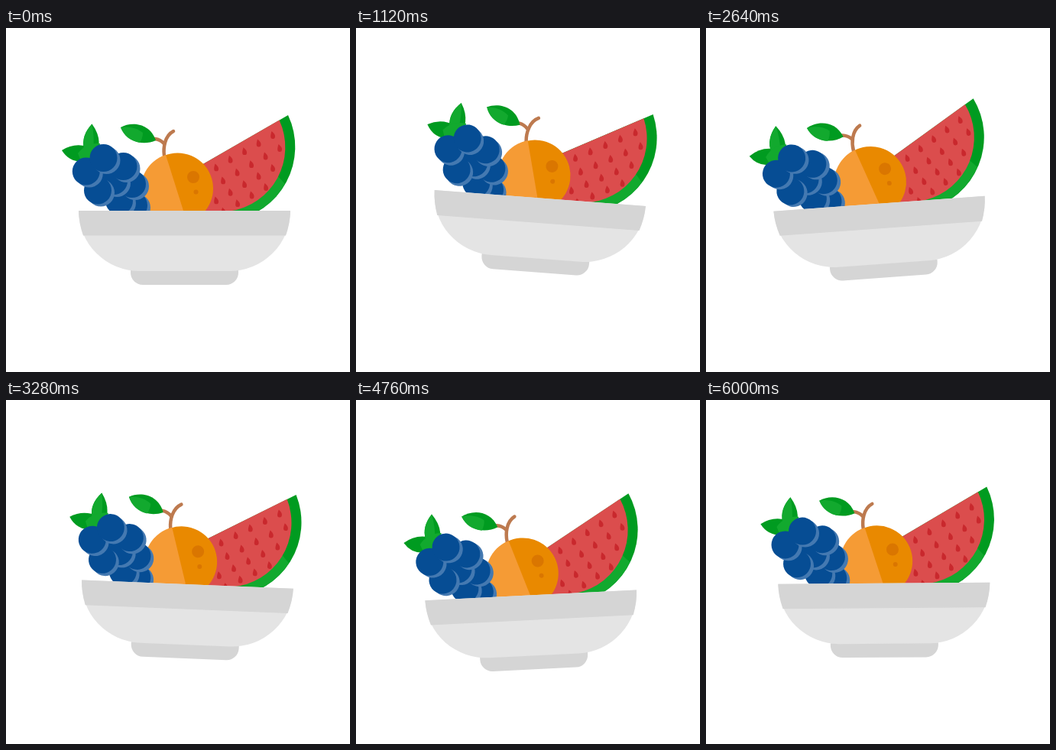
Animation, 450 px wide and 450 px high, one loop 6.04 s. Source, as an HTML page:

```html
<!DOCTYPE html>
<html lang="en">
<head>
<meta charset="utf-8">
<title>Fruit bowl</title>
<style>
html, body { margin: 0; width: 100%; height: 100%; overflow: hidden; background: #fff; }
svg { display: block; width: 100%; height: 100%; }
</style>
</head>
<body>
<svg viewBox="0 0 450 450">
  <g id="all">
    <g id="melon">
      <path fill="#009b20" d="M369 114A97.5 97.5 0 0 1 295 252L230 194Z"/>
      <path fill="#12a92e" d="M365 204A97.5 97.5 0 0 1 295 252L270 200L353 191Z"/>
      <path fill="#db4d4d" d="M357.500 120.600A84.300 84.300 0 0 1 293 239.500L230 250V194Z"/>
      <g id="seeds" fill="#c9282d"></g>
    </g>
    <g id="orange">
      <g fill="none" stroke="#bd7a4f" stroke-width="4.5" stroke-linecap="round">
        <path d="M207 167C205.500 157 207.500 141 219 135"/>
        <path d="M206.500 151Q202 146 195 145"/>
      </g>
      <path fill="#009b20" d="M150 130C164 122 188 124 196 147C180 154 159 150 150 130Z"/>
      <path fill="#12a92e" d="M150 130C161 128 172 131 179 137Q179 144 175 150C163 148 154 141 150 130Z"/>
      <circle cx="224.500" cy="210" r="46.500" fill="#e98900"/>
      <path fill="#f59b35" d="M209 166L237 254.800A46.500 46.500 0 0 1 209 166Z"/>
      <circle cx="245" cy="195" r="8" fill="#da7600"/>
      <circle cx="248.500" cy="214.500" r="3" fill="#da7600"/>
    </g>
    <g id="grapes">
      <path fill="#009b20" d="M73 160Q90 149 110 156L107 174Q84 178 73 160Z"/>
      <path fill="#009b20" d="M112.500 125.500Q98 141 102 158L114 172Q130 150 112.500 125.500Z"/>
      <path fill="#12a92e" d="M112.500 125.500Q98 141 102 158L114 160Q116 143 112.500 125.500Z"/>
      <path fill="#12a92e" d="M94 164Q104 150 123 151Q122 164 114 174H98Z"/>
      <g id="berries"></g>
    </g>
    <path fill="#d5d5d5" d="M163 317H304V320A16 16 0 0 1 288 336H179A16 16 0 0 1 163 320Z"/>
    <path fill="#e4e4e4" d="M95 239H372A80 79 0 0 1 292 318H175A80 79 0 0 1 95 239Z"/>
    <path fill="#d5d5d5" d="M95 239H372Q371.500 256 366 271.500H101Q95.500 256 95 239Z"/>
  </g>
</svg>
<script>
const el = id => document.getElementById(id);

// Seeds: four slanted rows of teardrops
el('seeds').innerHTML = [[349, 140], [358, 157], [349, 183], [340, 208]].map(([x, y]) =>
  [0, 1, 2, 3, 4].map(i =>
    `<path transform="translate(${x - 18.5 * i} ${y + 10.6 * i})" d="M-1.500 -5Q3.500 -1 3 2A2.900 2.900 0 0 1 -2.800 2Q-3 0 -1.500 -5Z"/>`
  ).join('')).join('');

// Each berry is a dark disc over a lighter one, upper left on top
el('berries').innerHTML = [[167, 232], [148, 226], [165, 204], [141, 200], [120, 212.5], [153.5, 181], [104.8, 187.5], [127.5, 170]]
  .map(([x, y]) =>
    `<circle cx="${x + 4}" cy="${y + 3}" r="18" fill="#4479b1"/><circle cx="${x}" cy="${y}" r="18" fill="#064d94"/>`
  ).join('');

const turn = (id, angle, x, y) => el(id).setAttribute('transform', `rotate(${angle} ${x} ${y})`);

function draw(now) {
  const t = Math.floor(now % 6040 / 40) * 40;
  const p = Math.max(0, t - 40) / 6000 * 2 * Math.PI;
  const rock = 2 * (p - 0.084 * Math.sin(p)) - 0.03 * (1 - Math.cos(p));
  const tilt = 5 * Math.sin(rock);
  const sway = 3.5 * (Math.sin(rock - 0.1) + 0.1);
  const lift = -17.7 * Math.sin(p) + 1.2 * (Math.cos(p) - 1);
  el('all').setAttribute('transform', `translate(0 ${lift}) rotate(${tilt} 233.5 336)`);
  turn('melon', 0.7 * sway, 264, 199);
  turn('orange', sway, 224.5, 210);
  turn('grapes', 1.3 * sway, 152, 234);
}

const start = performance.now();
function tick() {
  draw(performance.now() - start);
  requestAnimationFrame(tick);
}
tick();
</script>
</body>
</html>
```
